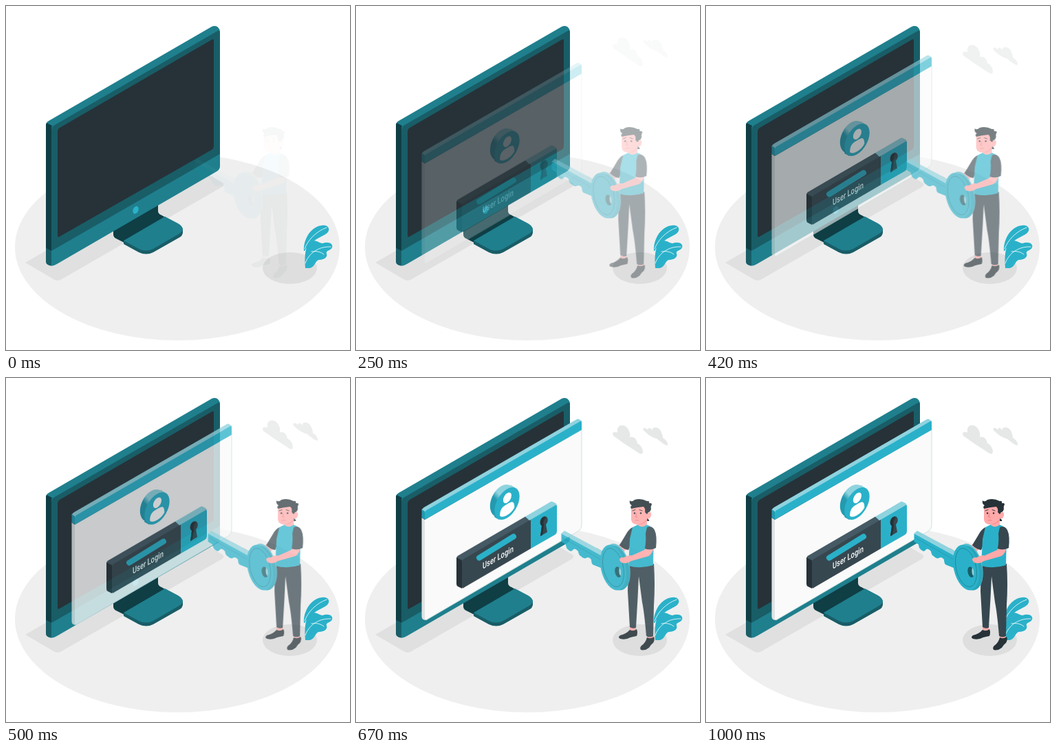
Animation of 500x500 px, one loop 1040 ms. Source, as an HTML page:

```html
<!DOCTYPE html>
<html lang="en">
<head>
<meta charset="utf-8">
<title>User login</title>
<style>
  html, body { margin: 0; width: 100%; height: 100%; overflow: hidden; background: #fff; }
  svg { display: block; width: 100%; height: 100%; }

  .teal { fill: #2ab1c9; }
  .light { fill: #8fd3df; }
  .mid { fill: #1f7f8d; }
  .deep { fill: #195d67; }
  .shade { fill: #0f3e45; }
  .slate { fill: #37474f; }
  .ink { fill: #263238; }
  .skin { fill: #ffa9a9; }
  .line { fill: none; stroke-linecap: round; stroke-linejoin: round; }
  text { font: 500 13px Roboto, Inter, sans-serif; fill: #fff; }

  .enter { animation: enter 1040ms infinite cubic-bezier(.36, -.01, .5, 1.38); }
  .panel { --from: 0, 30px; }
  .clouds { --from: 0, -30px; }
  .man { --from: -29px, 0; --fade: .04; animation-timing-function: ease-out; }
  @keyframes enter {
    from { opacity: var(--fade, 0); transform: translate(var(--from)); }
    94.2%, to { opacity: 1; transform: translate(0, 0); }
  }
</style>
</head>
<body>
<svg viewBox="0 0 500 500">
  <defs>
    <linearGradient id="rim" gradientUnits="userSpaceOnUse" x1="198" y1="186" x2="206" y2="166">
      <stop offset=".3" stop-color="#239ab0"/>
      <stop offset=".7" stop-color="#8fd3df"/>
    </linearGradient>
  </defs>

  <!-- floor and shadows -->
  <ellipse cx="249" cy="350.500" rx="236" ry="135.500" fill="#efefef"/>
  <path d="M28 373L273 232L315 257Q318 260 314 263L81 397Q75 401 69 397Z" fill="#e0e0e0"/>
  <ellipse cx="412.500" cy="381" rx="39.500" ry="23" fill="#dedede"/>

  <!-- stand -->
  <path class="shade" d="M156 324L221 286V298Q221 302 226 304L233 308L174 345L160 338Q156 336 156 332Z"/>
  <path class="deep" d="M171 341L257 324V329Q257 334 251 337L214 358Q204 363 193 358L171 346Z"/>
  <path class="mid" d="M171 341L231 306L250 316Q257 320 257 325Q256 329 250 332L214 353Q203 358 193 353Z"/>

  <!-- monitor -->
  <path class="mid" d="M58 174Q58 169 62 167L299 30Q303 28 307 30Q311 33 311 38V233Q311 237 307 240L74 375Q66 380 61 376Q58 374 58 371Z"/>
  <path class="deep" d="M66 180Q66 177 69 174L308 36Q311 35 311 39V215L66 356Z"/>
  <path class="shade" d="M58 174Q58 171 59 170L67 174Q66 176 66 180V356L58 352Z"/>
  <path class="deep" d="M58 352L66 356V377Q58 377 58 371Z"/>
  <path class="ink" d="M75 182Q75 179 78 177L299 49Q302 47 302 50V204Q302 207 299 209L78 335Q75 337 75 334Z"/>
  <ellipse class="teal" cx="188.500" cy="296.500" rx="3.900" ry="5.800" transform="rotate(22 188.500 296.500)"/>

  <!-- plant -->
  <path class="teal" d="M433 356C432 342 441 321 459 319C470 317 473 327 464 332C453 338 441 343 434 356Z"/>
  <path class="teal" d="M435 381C434 366 434 352 441 344L448 341C454 342 457 345 460 345C468 342 476 345 474 351C472 356 464 355 466 360C468 365 462 369 455 369C449 370 449 381 440 381Z"/>
  <path class="line" stroke="#fff" stroke-width=".8" d="M434 353C439 340 450 328 466 322M435 374C440 359 455 349 472 350M444 357Q455 355 462 361"/>

  <g class="enter clouds" fill="#e6e8e8">
    <path d="M374 84C371 78 376 78 380 79C378 66 392 65 397 77Q399 81 398 86C403 84 408 88 409 95C414 97 419 105 416 110Q414 111 411 109L388 94Q380 88 374 84Z"/>
    <path d="M418 76C416 72 420 71 424 75C425 71 429 72 430 76C431 70 441 70 444 79Q446 83 446 87C450 89 454 94 453 98Q450 98 446 95L437 88C431 87 424 82 418 76Z"/>
  </g>

  <g class="enter panel">
    <!-- window -->
    <path d="M95.500 203L100 206V352Q95.500 351 95.500 347Z" fill="#dfe3e3"/>
    <path d="M100 206L328 75V214Q328 219 324 222L105 350Q101 353 100 351Z" fill="#fafafa"/>
    <path class="line" stroke="#cfe0e0" d="M328 76V214Q328 219 324 222L105 350Q101 353 100 351"/>
    <path class="light" d="M95.500 192Q96 190 99 188L321 60Q323 59 325 60.500L328 62.500V66L100 197Z"/>
    <path class="teal" d="M100 196Q100 194 102 192.500L326 63Q328 62 328 65V75.500L100 206Z"/>
    <path d="M95.500 191L100 194V206L95.500 203Z" fill="#239ab0"/>

    <!-- avatar -->
    <g fill="url(#rim)">
      <ellipse cx="213" cy="178.500" rx="16.200" ry="25" transform="rotate(26 213 178.500)"/>
      <path d="M225 155.500L231 159.500L208 206L201 202Z"/>
    </g>
    <g transform="matrix(.866 -.5 0 1 219.500 182.500)">
      <circle class="teal" r="21"/>
      <g fill="#fff">
        <circle cx=".5" cy="-8" r="7"/>
        <path d="M-12 12C-12 0 -5 1 .5 1C7 1 12.500 1 12.500 12Q8 17 0 17T-12 12Z"/>
      </g>
    </g>

    <!-- login box -->
    <path fill="#455a64" d="M146 262Q146 260 148 258.500L246 201.500L254 206V209L154 267Z"/>
    <path class="light" d="M246 201.500L282 180.500Q284 179 286 180L290 182Q292 183 292 186L254 209Z"/>
    <path class="ink" d="M146 261L154 265V306L148 303Q146 302 146 299Z"/>
    <path class="slate" d="M154 267Q154 265 156 263.500L254 206V248L158 304Q154 307 154 304Z"/>
    <path class="teal" d="M254 206L290 185Q292 184 292 187V223Q292 226 289 228L254 248Z"/>
    <path class="line" stroke="#2ab1c9" stroke-width="8" d="M179 261.500L229 230.500"/>
    <path class="slate" d="M270 215C265 212 268 202 274 201C280 201 280 209 276 213L278 224L268 230Z"/>
    <path class="ink" d="M270 204Q273 201 276 203Q271 207 273 214L271 228L268 230L270 215Q266 211 270 204Z"/>
    <text transform="matrix(.72 -.415 0 1 184 278)">User Login</text>
  </g>

  <g class="enter man">
    <!-- far arm -->
    <path class="skin" d="M390 239L400 245L389 257L376 252Z"/>
    <path class="slate" d="M406 217Q400 220 396 228L387 243Q393 249 400 250L406 236Z"/>

    <!-- feet and legs -->
    <path class="skin" d="M402 360H411V370H402ZM427 372H436V382H428Z"/>
    <path class="ink" d="M402 366Q407 369 412 365Q414 370 412 375Q407 376 403 377Q396 381 388 379Q384 377 388 374Q397 372 402 366Z"/>
    <path class="ink" d="M427 377Q432 380 437 376Q439 380 436 385Q432 388 430 392Q424 397 418 395Q416 392 419 389Q425 385 427 377Z"/>
    <path class="slate" d="M400 271L437 270Q439 300 437 330L436 375Q431 378 426 375Q423 340 420 326L415 288L413.500 320L411 363Q406 365 402 362L399 310Z"/>

    <!-- torso -->
    <path class="teal" d="M406 217L414 213Q420 218 426 213Q436 216 437 224L436 272Q418 278 400 273L402 234Z"/>
    <path class="skin" d="M414 203H427V213Q421 219 414 214Z"/>
    <path fill="#f2888c" d="M415 210Q422 209 426 204V208Q421 213 415 213Z"/>

    <!-- head -->
    <path class="skin" d="M404 186Q415 179 427 186L428 196Q434 193 433 200Q431 206 427 204Q423 212 413 213Q405 213 404 206Z"/>
    <path class="ink" d="M404 190Q402 187 405 185Q401 183 402 178Q405 181 409 177Q418 174 427 179Q431 178 430 182Q434 181 434 184Q432 187 433 190Q432 195 429 195L427 198L424 195Q425 190 422 187Q412 188 404 190Z"/>
    <path class="ink" d="M427 204Q431 206 430 208L427 208Z"/>
    <circle class="ink" cx="409" cy="196.500" r="1.200"/>
    <circle class="ink" cx="418" cy="196.500" r="1.200"/>
    <path class="line" stroke="#263238" stroke-width=".9" d="M406 193L410 191.500M416 191.500L420 193"/>
    <path class="line" stroke="#e8777d" stroke-width=".9" d="M412 197L410.500 202L413 202.500M410 207Q413 206 415 207"/>

    <!-- key -->
    <path class="skin" d="M348 249Q353 245 358 249L363 254L355 256Z"/>
    <path class="teal" d="M302.500 226L363 259L360 276L350 272Q346 271 346 264Q343 260 340 261Q335 264 331 259Q328 258 327 252Q323 247 320 249Q317 254 313 250Q309 247 309 242L302.500 238Z"/>
    <path class="light" d="M302.500 226L307 222L365 253L362 259Z"/>
    <path class="line" stroke="#239ab0" stroke-width=".8" d="M304 232L360 264"/>
    <ellipse cx="384" cy="274" rx="17.500" ry="34" transform="rotate(-13 384 274)" fill="#5cc0d1"/>
    <ellipse cx="383" cy="276" rx="18" ry="33.200" transform="rotate(-13 383 276)" fill="#28a4ba"/>
    <ellipse class="teal" cx="378" cy="275.500" rx="18" ry="33.500" transform="rotate(-13 378 275.500)"/>
    <ellipse class="line" cx="378" cy="275.500" rx="14.500" ry="28.500" transform="rotate(-13 378 275.500)" stroke="#1f8294" stroke-width=".8"/>
    <ellipse class="deep" cx="385" cy="282" rx="4.500" ry="8" transform="rotate(-13 385 282)"/>
    <path class="light" d="M387 275Q391 281 389 288Q385 284 387 275Z"/>

    <!-- near arm -->
    <path class="skin" d="M427 245L437 244Q436 255 429 259L404 266Q399 270 394 269Q388 269 387 264Q388 260 393 261Q399 257 405 258L423 250Z"/>
    <path class="slate" d="M427 217Q434 214 438 221Q442 229 440 247Q432 251 424 248Q426 236 425 226Z"/>
  </g>
</svg>
</body>
</html>
```
